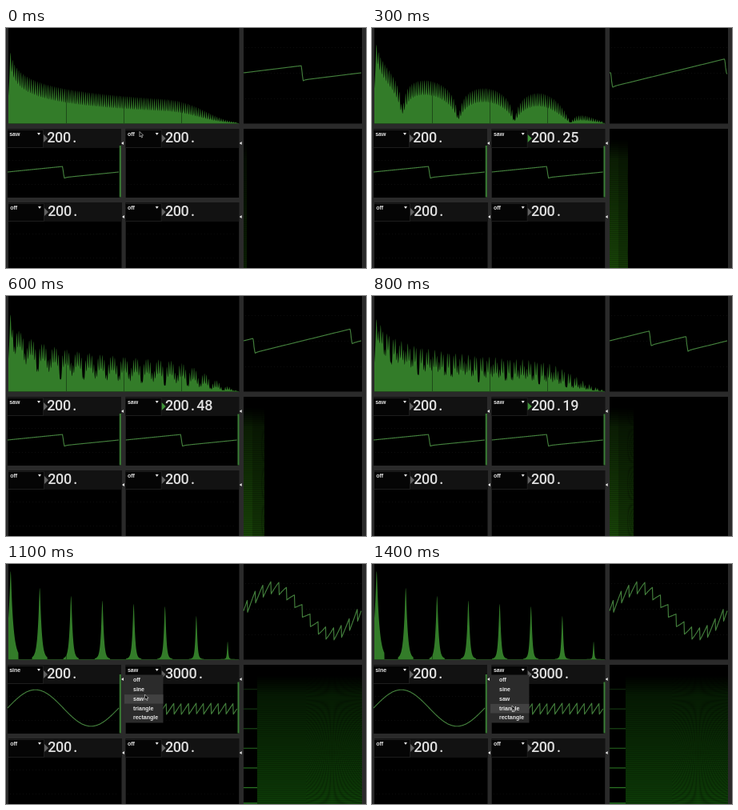
Animation of 450x300 px, one loop 1.45 s. Source, as an HTML page with a canvas:

```html
<!DOCTYPE html>
<html lang="en">
<head>
<meta charset="utf-8">
<title>Oscillator bank</title>
<style>
html, body { margin: 0; width: 100%; height: 100%; overflow: hidden; background: #000; }
canvas { display: block; width: 450px; height: 300px; }
</style>
</head>
<body>
<canvas id="stage" width="450" height="300"></canvas>
<script>
const ctx = document.getElementById('stage').getContext('2d');
const LOOP = 1450, STEP = 50;
const SECOND_OSC_ON = 2, SINE_SCENE = 19;
const GREEN = '#337c29', WAVE = '#437f3c', FRAME = '#2a2a2a', WHITE = '#e6e6e6';
const HARMONIC = 2.607; // spectrum pixels per 200 Hz
const OCTAVE = 10;      // spectrum pixels per doubling of amplitude

const clamp = (v, lo = 0, hi = 1) => Math.min(hi, Math.max(lo, v));

// Piecewise linear track through [step, value] points.
function track(points, n) {
  if (n <= points[0][0]) return points[0][1];
  for (let i = 1; i < points.length; i++) {
    const [a, va] = points[i - 1], [b, vb] = points[i];
    if (n <= b) return va + (vb - va) * (n - a) / (b - a);
  }
  return points[points.length - 1][1];
}

const DETUNE = [[3, 0], [8, .41], [12, .48], [16, .19], [18, .1]];
const PHASE = [[3, 0], [8, .062], [12, .18], [16, .31], [18, .34]];
const SWEEP = [[0, 4], [1, 5], [2, 20], [3, 21], [8, 24], [12, 26], [16, 30], [18, 31]];

function rect(x, y, w, h, color) {
  ctx.fillStyle = color;
  ctx.fillRect(x, y, w, h);
}

function polygon(points, color) {
  ctx.beginPath();
  points.forEach(([x, y]) => ctx.lineTo(x, y));
  ctx.closePath();
  ctx.fillStyle = color;
  ctx.fill();
}

function label(text, x, y) {
  ctx.font = 'bold 7px "Liberation Sans", Arial, sans-serif';
  ctx.fillStyle = WHITE;
  ctx.fillText(text, x, y);
}

function readout(text, x, y) {
  ctx.font = '500 18px Roboto, sans-serif';
  ctx.fillStyle = '#dedede';
  ctx.textAlign = 'center';
  [...text].forEach((c, i) => ctx.fillText(c, x + 5 + i * 9.85, y));
  ctx.textAlign = 'left';
}

function curve(x0, x1, f) {
  ctx.beginPath();
  for (let x = x0; x <= x1; x += .5) ctx.lineTo(x, f(x));
  ctx.strokeStyle = WAVE;
  ctx.lineWidth = 1.15;
  ctx.lineJoin = 'round';
  ctx.stroke();
}

function dots(x0, x1, y) {
  for (let x = x0; x < x1; x += 4) rect(x, y, 1, 1, '#0d0d0d');
}

// Rising saw in -1..1, zero at phase 0, falling at phase 0.5.
const saw = p => 2 * (p - Math.floor(p + .5));
// Soft step of a falling edge, with a short overshoot.
const edge = d => clamp((d + 1) / 2.5) + (d > 0 ? .12 * Math.exp(-d / 2) : 0);

function rolloff(x) {
  return 40 * Math.pow(Math.max(0, x - 195) / 80, 2.3);
}

function spectrumPeaks(n) {
  const peaks = [];
  const add = (x, height) => peaks.push({ x, height: height - rolloff(x) });
  if (n >= SINE_SCENE) {
    add(5.8, 110);
    for (let k = 1; k <= 7; k++) add(3 + 39.15 * k, 89 - OCTAVE * Math.log2(k));
    return peaks;
  }
  const phase = track(PHASE, n);
  for (let k = 1; k < 110; k++) {
    const gain = n < SECOND_OSC_ON ? .5 : Math.abs(Math.cos(Math.PI * k * phase));
    add(3 + HARMONIC * k, 98 - 9.7 * Math.log2(k) + OCTAVE * Math.log2(Math.max(gain, .02)));
  }
  return peaks;
}

function drawSpectrum(n) {
  const peaks = spectrumPeaks(n);
  ctx.beginPath();
  ctx.moveTo(3, 119.5);
  for (let x = 3; x <= 291; x += .2) {
    let amplitude = 1;
    for (const p of peaks) {
      const d = Math.abs(x - p.x) / .8;
      if (d < 12) amplitude += 2 ** ((p.height - 23 * Math.log(1 + d * d)) / OCTAVE);
    }
    ctx.lineTo(x, 118.9 - OCTAVE * Math.log2(amplitude));
  }
  ctx.lineTo(291, 119.5);
  ctx.fillStyle = GREEN;
  ctx.fill();
  for (const x of [75, 147, 219]) rect(x, 0, 1, 119, 'rgba(0,0,0,.4)');
}

function drawScope(n) {
  [24, 56, 88].forEach(y => dots(299, 444, y));
  if (n >= SINE_SCENE) {
    curve(297, 444, x => {
      const p = (x - 297) / 147;
      return 58.5 - 29 * Math.sin(2 * Math.PI * p) - 8 * saw(p * 15);
    });
    return;
  }
  const phase = track(PHASE, n);
  const gap = 148 * (n >= 6 && n < 14 ? 1 - phase : phase);
  const drops = n < SECOND_OSC_ON ? [370] : [370.5 - gap / 2, 370.5 + gap / 2];
  curve(297, 444, x => drops.reduce(
    (y, d) => y - .123 * (x - 297) + 18.1 * edge(x - d), 56));
}

// Spectrogram texture: striped glow with beating harmonics.
function makeField(beat, shade, red) {
  const field = document.createElement('canvas');
  field.width = 148;
  field.height = 174;
  const g = field.getContext('2d');
  for (let x = 0; x < 148; x++) {
    for (let y = 0; y < 174; y++) {
      const k = (178 - y) / 1.64;
      const level = clamp((y - 12) / 25) * (.3 + .7 * y / 174);
      const stripe = .88 + .12 * Math.cos(2 * Math.PI * k);
      const ripple = .75 + .25 * Math.abs(Math.cos(Math.PI * k * beat(x)));
      const v = 76 * level * stripe * ripple * shade(x);
      g.fillStyle = `rgb(${v * red | 0},${v | 0},${v * .12 | 0})`;
      g.fillRect(x, y, 1, 1);
    }
  }
  return field;
}

const freshField = makeField(
  x => x < 21 ? 0 : (x - 21) * .035,
  x => x < 11 ? .95 : .75,
  .36);
const oldField = makeField(
  x => x < 78 ? 0 : (x - 110) * .012,
  x => x < 78 ? .82 : .9,
  .22);

function drawSpectrogram(n) {
  if (n < SINE_SCENE) {
    const w = track(SWEEP, n);
    ctx.globalAlpha = n < SECOND_OSC_ON ? .45 : 1;
    ctx.drawImage(freshField, 0, 0, w, 174, 297, 126, w, 174);
    ctx.globalAlpha = 1;
    return;
  }
  const w = 17 + (n - 22) * .5;
  ctx.drawImage(oldField, w, 0, 148 - w, 174, 297 + w, 126, 148 - w, 174);
  for (let k = 1; k <= 6; k++) {
    rect(297, 303.5 - 24.6 * k, w, 1.3, `rgba(46,125,38,${1.05 - k * .13})`);
  }
  rect(297, 298, w, 2, '#1d5a1a');
}

function drawOscillator(x, y, kind, value, { active, wave, meter } = {}) {
  rect(x, y, 141.5, 86, '#000');
  rect(x, y, 141.5, 24, '#121212');
  rect(x, y + 1, 45, 23, '#1d1d1d');
  rect(x, y + 2, 44, 21, '#050505');
  dots(x + 2, x + 138, y + 39);
  dots(x + 2, x + 138, y + 69);
  label(kind, x + 2.2, y + 8.9);
  polygon([[x + 37, y + 5], [x + 41, y + 5], [x + 39, y + 8]], WHITE);
  polygon([[x + 45, y + 7], [x + 50, y + 12], [x + 45, y + 17]], active ? '#3e9238' : '#626262');
  readout(value, x + 49.3, y + 17.2);
  if (wave) curve(x, x + 139, px => y + 54 - wave((px - x) / 139));
  if (meter) rect(x + 139.8, meter, 2, 211.5 - meter, '#3b7f36');
  polygon([[x + 142, y + 18], [x + 145, y + 16], [x + 145, y + 20]], WHITE);
}

function drawCursor(x, y) {
  ctx.beginPath();
  [[0, 0], [0, 6.5], [1.5, 5.2], [2.6, 7.6], [3.6, 7.1], [2.6, 4.8], [4.6, 4.6]]
    .forEach(([dx, dy]) => ctx.lineTo(x + dx, y + dy));
  ctx.closePath();
  ctx.fillStyle = '#000';
  ctx.fill();
  ctx.strokeStyle = '#ccc';
  ctx.lineWidth = .7;
  ctx.stroke();
}

function drawMenu(n) {
  const cursorY = track([[22, 163], [28, 177]], n);
  const hovered = Math.floor((cursorY + 1 - 139.5) / 11.8);
  rect(148, 138.5, 48.5, 60, '#2b2b2b');
  rect(148, 139.5 + 11.8 * hovered, 48.5, 11.5, '#414141');
  ['off', 'sine', 'saw', 'triangle', 'rectangle']
    .forEach((item, i) => label(item, 159, 147.3 + 11.75 * i));
  drawCursor(track([[22, 173.5], [28, 175]], n), cursorY);
}

const slowSaw = p => 14 * p - 14 * edge((p - .5) * 139);
const sine = p => 22.8 * Math.sin(2 * Math.PI * p);
const fastSaw = p => 7 * saw(p * 15) - 1;

function draw(n) {
  const sineScene = n >= SINE_SCENE;
  const on = n >= SECOND_OSC_ON;
  rect(0, 0, 450, 300, FRAME);
  rect(3, 0, 288.5, 119.5, '#000');
  rect(297, 0, 148, 119.5, '#000');
  rect(297, 126, 148, 174, '#000');
  drawSpectrum(n);
  drawScope(n);
  drawSpectrogram(n);

  drawOscillator(2, 126, sineScene ? 'sine' : 'saw', '200.', {
    wave: sineScene ? sine : slowSaw,
    meter: sineScene ? 138 : 147,
  });
  let value = '200.';
  if (sineScene) value = '3000.';
  else if (on) value = (200 + track(DETUNE, n)).toFixed(2);
  drawOscillator(149.7, 126, on ? 'saw' : 'off', value, {
    active: on && !sineScene,
    wave: sineScene ? fastSaw : on ? slowSaw : null,
    meter: on ? 147.5 : 0,
  });
  drawOscillator(3, 218, 'off', '200.');
  drawOscillator(149.7, 218, 'off', '200.');

  if (sineScene) drawMenu(n);
  else if (!on) drawCursor(167, 129.5);
}

let shown = -1;
function tick() {
  const n = Math.floor(performance.now() % LOOP / STEP);
  if (n !== shown) draw(shown = n);
  requestAnimationFrame(tick);
}
tick();
</script>
</body>
</html>
```
